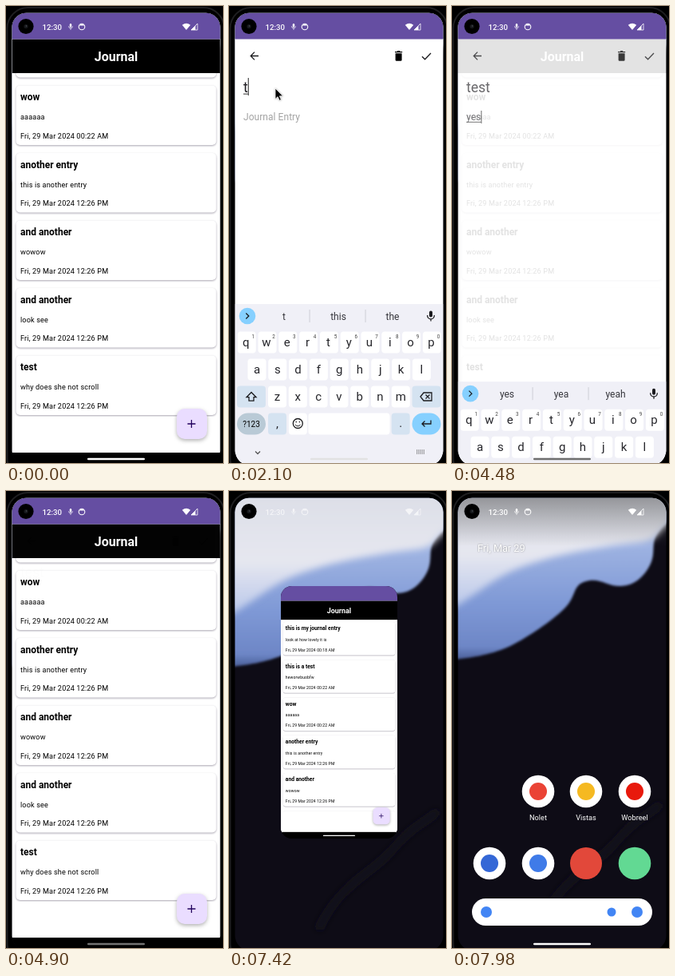
Write an HTML page that moves like this. It is 272 px wide and 572 px high and loops after 8 s.

```html
<!DOCTYPE html>
<html lang="en">
<head>
<meta charset="utf-8">
<title>Journal app</title>
<style>
  html, body { margin: 0; width: 100%; height: 100%; overflow: hidden; background: #000; }
  svg { display: block; }
  text { font-family: Roboto, sans-serif; white-space: pre; }
  .mid { text-anchor: middle; }
  .card { fill: #fff; filter: drop-shadow(0 1.1px .9px rgba(40, 30, 60, .4)); }
  .head { font-size: 12px; font-weight: 700; }
  .small { font-size: 9.1px; letter-spacing: .16px; }
  .fab { fill: #eaddff; filter: drop-shadow(0 2px 2.5px rgba(0, 0, 0, .3)); }
  .title { font-size: 17.5px; fill: #1d1b20; }
  .body { font-size: 12px; letter-spacing: .05px; fill: #3c3b40; }
  .title.hint, .body.hint { fill: #a3a3a3; }
  .line { fill: none; stroke: #1c1c1f; stroke-width: 1.3; }
  .key { font-size: 15px; fill: #26262b; }
  .word { font-size: 12px; fill: #36363c; }
  .label { font-size: 9.2px; fill: #fff; }
  #pointer { filter: drop-shadow(0 .6px .8px rgba(0, 0, 0, .35)); }
</style>
</head>
<body>
<script>
const LOOP = 8000, PITCH = 84.5, SCROLL = 158.5;
const SCREEN = { x: 7.5, y: 8.7, w: 261, h: 566, r: 18 };

const clamp = v => Math.max(0, Math.min(1, v));
const mix = (a, b, p) => a + (b - a) * p;
const span = (t, from, to) => clamp((t - from) / (to - from));
const easeOut = p => 1 - (1 - p) ** 3;
const smooth = p => p * p * (3 - 2 * p);

// cubic-bezier(.4, 0, .2, 1)
function standardEase(x) {
  let lo = 0, hi = 1, u = .5;
  for (let i = 0; i < 20; i++) {
    u = (lo + hi) / 2;
    const bx = 1.2 * (1 - u) ** 2 * u + .6 * (1 - u) * u * u + u ** 3;
    if (bx < x) lo = u; else hi = u;
  }
  return u * u * (3 - 2 * u);
}

// Linear track through [time, value] points
function track(points, t) {
  let [t0, v0] = points[0];
  for (const [t1, v1] of points) {
    if (t < t1) return mix(v0, v1, span(t, t0, t1));
    [t0, v0] = [t1, v1];
  }
  return v0;
}

// Latest value of a [time, value] list
const latest = (steps, t) => steps.filter(s => s[0] <= t).pop()[1];

const rect = (x, y, w, h, r, fill, extra = '') =>
  `<rect x="${x}" y="${y}" width="${w}" height="${h}" rx="${r}" fill="${fill}" ${extra}/>`;
const disc = (x, y, r, fill) => `<circle cx="${x}" cy="${y}" r="${r}" fill="${fill}"/>`;
const text = (x, y, cls, s, extra = '') => `<text x="${x}" y="${y}" class="${cls}" ${extra}>${s}</text>`;
const line = (d, extra = '') => `<path class="line" d="${d}" ${extra}/>`;
const pill = (id, fill) => rect(102, 565.8, 72, 2.4, 1.2, fill, `id="${id}"`);

const entries = [
  ['this is my journal entry', 'look at how lovely it is', '00:18 AM'],
  ['this is a test', 'heworwbuobfw', '00:22 AM'],
  ['wow', 'aaaaaa', '00:22 AM'],
  ['another entry', 'this is another entry', '12:26 PM'],
  ['and another', 'wowow', '12:26 PM'],
  ['and another', 'look see', '12:26 PM'],
  ['test', 'why does she not scroll', '12:26 PM'],
];

const card = ([head, body, time], i) => `<g transform="translate(0 ${89 + i * PITCH})">
  <rect class="card" x="12.5" width="251" height="74.5" rx="5"/>
  ${text(18, 18.6, 'head', head)}${text(18, 42.6, 'small', body)}
  ${text(18, 66.2, 'small', 'Fri, 29 Mar 2024 ' + time)}</g>`;

const listScreen = `<g id="list">
  ${rect(7, 41, 262, 519, 0, '#fff')}
  <g clip-path="url(#listClip)"><g id="cards">${entries.map(card).join('')}</g></g>
  ${rect(7, 41.5, 262, 42.5, 0, '#000')}
  ${text(138, 69, 'mid', 'Journal', 'font-size="16" font-weight="700" fill="#fff"')}
  <rect class="fab" x="214" y="504" width="38" height="38" rx="10"/>
  ${line('M227.5 523h10M232.5 518v10', 'style="stroke:#21005d"')}</g>`;

const editorScreen = `<g id="editor">
  ${rect(7, 41, 262, 519, 0, '#fff')}
  ${line('M37 62.5H27.5M32 57.6L27.2 62.5 32 67.4')}
  <path d="M208 57h2.6l.8-1h2.4l.8 1h2.6v1.3H208zM208.6 59.2h8v8.2q0 1.4-1.4 1.4h-5.2q-1.4 0-1.4-1.4z"/>
  ${line('M242 63.2l3.6 3.6 7.4-7.8')}
  ${text(18, 108, 'title hint', 'Title', 'id="titleHint"')}
  ${text(18, 143, 'body hint', 'Journal Entry', 'id="bodyHint"')}
  ${text(18, 108, 'title', '', 'id="title"')}
  ${text(18, 143, 'body', '', 'id="body"')}
  ${rect(18, 109.6, 0, 1, 0, '#333', 'id="underline"')}
  ${rect(18, 90, 1, 22, 0, '#222', 'id="caret"')}</g>`;

function keyboard() {
  const GREY = '#d5e3f1', BLUE = '#86d0ff';
  const key = (x, y, w, fill = '#fff', r = 4) => rect(x - w / 2, y - 13.5, w, 27, r, fill);
  const row = (letters, x0, y, numbers) => [...letters].map((c, i) => {
    const x = x0 + i * 25.8;
    return key(x, y, 23) + text(x - (numbers ? 1 : 0), y + 5, 'key mid', c) +
      (numbers ? text(x + 8, y - 5, 'mid', (i + 1) % 10, 'font-size="6.3" fill="#444"') : '');
  }).join('');
  const keyIcon = Array.from({ length: 15 }, (_, i) =>
    rect(235 + i % 5 * 2.2, 555.5 + Math.floor(i / 5) * 2, 1.2, 1.1, 0, '#666')).join('');
  return `<g id="keyboard">${rect(7, 373, 262, 205, 0, '#f0f0f7')}
    ${disc(23, 388, 10.3, BLUE)}${line('M21.3 384.5l3.5 3.5-3.5 3.5')}
    ${[69, 137, 205].map(x => text(x, 392.6, 'mid word', '')).join('')}
    ${rect(100.6, 380, .9, 16, 0, '#c9cad3')}${rect(170.6, 380, .9, 16, 0, '#c9cad3')}
    ${rect(251, 381.5, 4, 8, 2, '#1b1b1f')}${line('M248.7 387v.5a4.3 4.3 0 0 0 8.6 0V387M253 391.5v3')}
    ${row('qwertyuiop', 22.2, 421, true)}${row('asdfghjkl', 35, 455)}${row('zxcvbnm', 60.5, 489)}
    ${key(28, 489, 36, GREY)}${line('M28 483.5l-6 6.2h3v4.5h6v-4.5h3z')}
    ${key(247.5, 489, 36, GREY)}${line('M240 489l4-5h10v10h-10zM246.5 486.5l5 5M251.5 486.5l-5 5')}
    ${key(28, 523, 36, '#b9cad6', 13.5)}${text(28, 526.6, 'mid', '?123', 'font-size="10"')}
    ${key(60.5, 523, 23, GREY)}${text(60.5, 528, 'key mid', ',')}
    ${key(86.3, 523, 23)}<circle class="line" cx="86.3" cy="522.5" r="6"/>
    ${line('M83 524q3.3 3.6 6.6 0', 'style="stroke-width:1"')}
    ${disc(84.2, 520.6, .8, '#1b1b1f')}${disc(88.4, 520.6, .8, '#1b1b1f')}
    ${key(150.5, 523, 102)}${key(215.2, 523, 23, GREY)}${text(215.2, 527, 'key mid', '.')}
    ${key(247.5, 523, 36, BLUE, 13.5)}${line('M253 518.5v4.5h-11M245.5 519.5L242 523l3.5 3.5')}
    ${line('M33 557.5l3 3 3-3', 'style="stroke:#555"')}
    ${keyIcon}</g>`;
}

const tile = (x, y, color) => disc(x, y, 20.3, '#fff') + disc(x, y, 11, color);
const home = `<g id="home">
  ${rect(7, 8, 262, 61, 0, 'url(#scrim)')}
  ${text(32, 76, '', 'Fri, Mar 29', 'font-size="12.7" fill="#fff" style="filter:drop-shadow(0 0 1px #5559)"')}
  ${tile(108, 376, '#ea4335')}${tile(168, 376, '#f5b921')}${tile(229, 376, '#e8190c')}
  ${text(108, 412, 'label mid', 'Nolet')}${text(168, 412, 'label mid', 'Vistas')}${text(229, 412, 'label mid', 'Wobreel')}
  ${tile(47, 466, '#3467d6')}${tile(108, 466, '#3f7be8')}
  ${disc(168, 466, 20, '#e2483a')}${disc(229, 466, 20.3, '#62d993')}
  ${rect(25, 510, 226, 34, 17, '#fff')}
  ${disc(43, 527, 7, '#4285f4')}${disc(200, 527, 5.5, '#4285f4')}${disc(232, 527, 7, '#4285f4')}
  ${pill('homePill', '#fff')}</g>`;

const wallpaper = `${rect(0, 0, 272, 580, 0, '#0e0c16')}<g id="wallpaper">
  <path d="M-9 212C30 209 55 203 75 193S125 163 141 147 150 118 168 113 195 120 212 119 240 108 248 93 249 66 257 54 268 40 290 28V-30H-9Z"
    fill="url(#blue)" filter="url(#soft)"/>
  <path d="M-9 152C30 132 50 108 90 94S150 77 190 70 240 66 254 58L290 22V-30H-9Z"
    fill="url(#pale)" filter="url(#softer)"/>
  <path d="M112 540C140 480 180 470 205 440S240 410 262 392" fill="none" stroke="#13121d" stroke-width="8" filter="url(#softer)"/></g>`;

const statusBar = `<g id="status" fill="#fff">
  ${text(45.5, 29.6, '', '12:30', 'font-size="9.7" font-weight="500"')}
  ${rect(79.8, 22, 2.4, 4.6, 1.2, '#fff')}
  <path d="M78.5 25.3a2.5 2.5 0 0 0 5 0M81 28v2" fill="none" stroke="#fff" stroke-width=".7"/>
  <circle cx="95" cy="26" r="3.8" fill="none" stroke="#fff" stroke-width="1.1"/>
  <path d="M91.5 24.5q3.5-4 7 0z"/>
  <path d="M220.8 23.8q5.2-4 10.4 0L226 30z"/>
  <path d="M240 22v8h-8z" fill="none" stroke="#fff" stroke-width=".8"/><path d="M237.5 24.5V30H232z"/></g>`;

const gradient = (id, ...stops) => `<linearGradient id="${id}" x2="0" y2="1">${stops.map(([o, c]) =>
  `<stop offset="${o}" stop-color="${c}"/>`).join('')}</linearGradient>`;
const blur = (id, amount) => `<filter id="${id}"><feGaussianBlur stdDeviation="${amount}"/></filter>`;
const { x, y, w, h, r } = SCREEN;

document.body.innerHTML = `<svg width="272" height="572" viewBox="0 0 272 572"><defs>
  ${gradient('blue', [.3, '#a9bce6'], [.7, '#7f99d6'], [.93, '#6d86c6'], [1, '#485c96'])}
  ${gradient('pale', [.1, '#dcdee6'], [.6, '#e6e7f0'], [1, '#b4c4e9'])}
  ${gradient('scrim', [0, '#5558'], [1, '#5550'])}
  ${blur('soft', 1.8)}${blur('softer', 4)}
  <clipPath id="screenClip">${rect(x, y, w, h, r, '#000')}</clipPath>
  <clipPath id="listClip">${rect(7, 84, 262, 430, 0, '#000')}</clipPath>
  <clipPath id="appClip">${rect(x, y, w, h, r, '#000', 'id="appShape"')}</clipPath></defs>
  ${rect(0, 0, 272, 572, 0, '#000')}
  ${rect(1.5, 2, 272, 590, 26, 'none', 'stroke="#1f1f21" stroke-width="2"')}
  <g clip-path="url(#screenClip)">${wallpaper}${home}
    <g id="app" clip-path="url(#appClip)">
      ${rect(7, 8, 262, 567, 0, '#000')}${rect(7, 41, 262, 518, 0, '#fff')}
      ${listScreen}${editorScreen}
      ${rect(7, 8, 262, 33.5, 0, '#654ea2')}${rect(7, 559, 262, 16, 0, '#000')}
      ${keyboard()}${pill('appPill', '#fff')}</g></g>
  ${statusBar}${disc(25, 25.5, 9.6, '#000')}${disc(25, 25.5, 2.6, '#17191c')}${disc(25.5, 25, .8, '#50555a')}
  <path id="pointer" d="M0 0V13.4l3.1-2.8 2.1 4.7 2.2-1-2-4.5h4.2z" stroke="#fff" stroke-width=".8"/></svg>`;

const $ = id => document.getElementById(id);
const set = (id, attrs) => { for (const k in attrs) $(id).setAttribute(k, attrs[k]); };
const words = document.querySelectorAll('.word');

const titleSteps = [[0, ''], [2100, 't'], [2380, 'te'], [2520, 'tes'], [2590, 'test']];
const bodySteps = [[0, ''], [3290, 'y'], [3430, 'ye'], [3570, 'yes']];
const wordSteps = [
  [0, ['', '', '']], [2100, ['t', 'this', 'the']], [2380, ['te', 'the', 'there']],
  [2520, ['tes', 'test', 'there']], [2800, ['', '', '']], [3290, ['y', 'you', 'yes']],
  [3640, ['ye', 'yes', 'year']], [3850, ['yes', 'yea', 'yeah']],
];

function drawEditor(t) {
  const inTitle = t >= 1680 && t < 2800, inBody = t >= 2800;
  $('title').textContent = latest(titleSteps, t);
  $('body').textContent = latest(bodySteps, t);
  set('titleHint', { opacity: t < 1680 ? 1 : 0 });
  set('bodyHint', { opacity: inBody ? 0 : 1 });
  const length = inTitle || inBody ? $(inBody ? 'body' : 'title').getComputedTextLength() : 0;
  set('underline', { y: inBody ? 144.8 : 109.6, width: length });
  set('caret', {
    x: 18 + length, y: inBody ? 131 : 90, height: inBody ? 16 : 22, opacity: inTitle || inBody ? 1 : 0,
  });
  latest(wordSteps, t).forEach((word, i) => { words[i].textContent = word; });

  const px = track([[2730, 58], [2870, 59], [3010, 59], [3080, 61]], t);
  const py = track([[2730, 103], [2870, 137]], t);
  set('pointer', { transform: `translate(${px} ${py})`, opacity: t >= 1050 && t < 4410 ? 1 : 0 });
}

function drawApp(t) {
  const shown = standardEase(span(t, 380, 1080)) - standardEase(span(t, 4280, 4980));
  set('editor', { opacity: shown });
  set('list', { opacity: 1 - shown });
  set('cards', { transform: `translate(0 ${-SCROLL * (1 - smooth(span(t, 5470, 6020)))})` });
  const raised = easeOut(span(t, 1780, 2060)) - smooth(span(t, 4370, 4600));
  set('keyboard', { transform: `translate(0 ${205 * (1 - raised)})`, opacity: raised > 0 ? 1 : 0 });
  const g = Math.round(track([[1800, 255], [2100, 226], [2300, 215], [3430, 100], [4950, 115], [5400, 255]], t));
  set('appPill', { fill: `rgb(${g},${g},${g})` });
}

function drawHome(t) {
  const leaving = t >= 7420, p = smooth(span(t, 7420, 7880));
  const width = mix(146, 40, p), height = mix(316, 40, p), s = leaving ? width / w : 1;
  const left = mix(138, 229, p) - width / 2, top = mix(277, 466, p) - height / 2;
  set('app', {
    transform: leaving ? `translate(${left - x * s} ${top - y * s}) scale(${s})` : '',
    opacity: 1 - span(p, .6, .95),
  });
  set('appShape', { height: leaving ? height / s : h, rx: leaving ? mix(14, 20, p) / s : r });
  set('home', { opacity: smooth(span(t, 7480, 7860)) });
  set('status', { opacity: leaving ? mix(.65, 1, span(t, 7420, 7850)) : 1 });
  set('wallpaper', { transform: `translate(0 ${9 * (1 - easeOut(span(t, 7420, 7950)))})` });
}

function draw(now) {
  const t = now % LOOP;
  drawEditor(t);
  drawApp(t);
  drawHome(t);
}

const start = performance.now();
function tick() {
  draw(performance.now() - start);
  requestAnimationFrame(tick);
}
tick();
</script>
</body>
</html>
```
